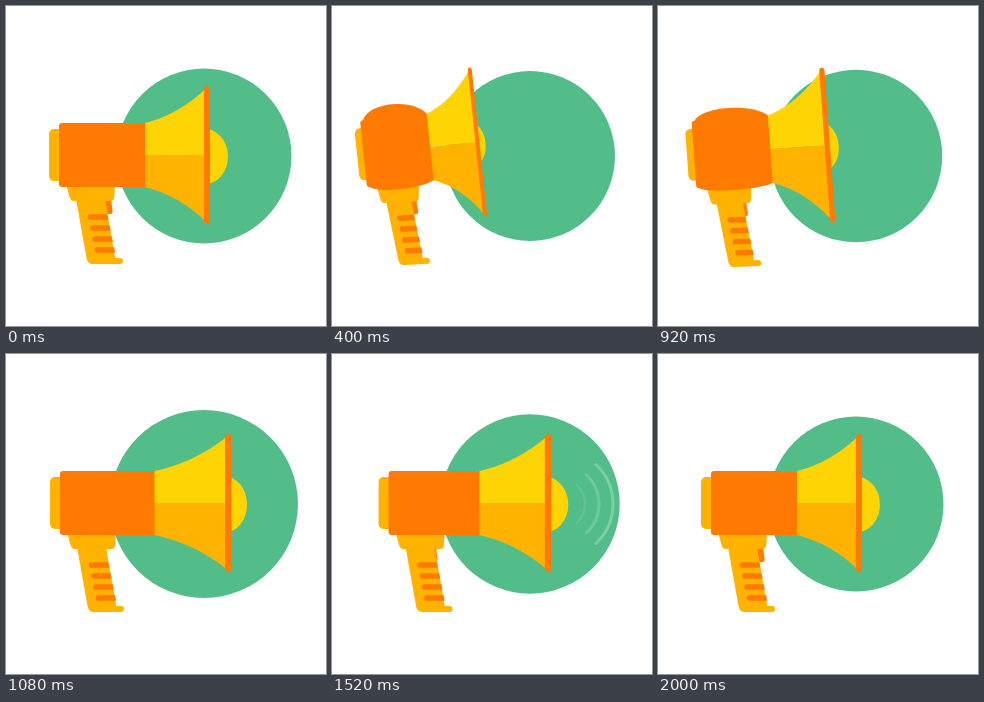
An HTML page for the animation above (2.8 s loop, 320x320 px).

```html
<!DOCTYPE html>
<html lang="en">
<head>
<meta charset="utf-8">
<title>Megaphone</title>
<style>
  html, body { margin: 0; width: 100%; height: 100%; overflow: hidden; background: #fff; }
  svg { display: block; width: 100vw; height: 100vh; }
  .green { fill: #52bd89; }
  .orange { fill: #ff7a00; }
  .amber { fill: #ffb300; }
  .yellow { fill: #ffd405; }
  .wave { fill: none; stroke: #7dcfa7; stroke-width: 3; stroke-linecap: round; }
  .ridge { fill: none; stroke: #ff7a00; stroke-width: 5.6; }
</style>
</head>
<body>
<svg viewBox="0 0 320 320">
  <circle id="disc" class="green" cx="198" cy="150" r="87.5"/>
  <g id="waves"></g>
  <!-- handle origin: middle of the collar's top edge -->
  <g id="handle">
    <path id="trigger" class="orange" d="M9 12H21L22.6 24Q23 27 20 27H14Z"/>
    <path class="amber" d="M-24-3L-20.500 10Q-19.500 14-16 14H20Q24 14 24.300 10L25-3Z"/>
    <path class="amber" d="M-14 12L-3.300 72Q-2.300 77 3 77H30Q33 77 33 74T30 71H25.200L15 12Z"/>
    <g id="ridges"></g>
  </g>
  <g id="head">
    <ellipse id="dome" class="yellow"/>
    <rect id="cap" class="amber" rx="5"/>
    <path id="hornTop" class="yellow"/>
    <path id="hornLow" class="amber"/>
    <rect id="rim" class="orange"/>
    <path id="body" class="orange"/>
  </g>
</svg>
<script>
const LOOP = 2800, STEP = 40;
const NS = "http://www.w3.org/2000/svg";
const $ = id => document.getElementById(id);

function set(el, attrs) {
  for (const k in attrs) el.setAttribute(k, attrs[k]);
  return el;
}
const add = (parent, tag, attrs) =>
  set(parent.appendChild(document.createElementNS(NS, tag)), attrs);

// x, y, turn: head; w, h, bulge: body; horn, rim, half: bell;
// hx, hy, hs, hr: handle; pull: trigger; r: disc
const rest = {
  x: 53, y: 149, turn: 0, w: 86, h: 32, bulge: 0, cap: 10,
  horn: 59, rim: 6, half: 69, dome: 18, domeH: 28,
  hx: 84, hy: 181, hs: 1, hr: 0, pull: 0, r: 87.5
};
const stretch = { ...rest, x: 54, w: 94.5, horn: 70.5, rim: 6.5, dome: 15.5, hx: 85, pull: 6.5 };
delete stretch.r;

const squash = {
  x: 26.5, y: 148.5, turn: -6.8, w: 65, h: 35, bulge: 17, cap: 5,
  horn: 44, rim: 4.4, half: 82, dome: 4.5, domeH: 19,
  hx: 63, hy: 185, hs: .84, hr: -3.5, pull: 0, r: 83.5
};

const keys = [
  [0, rest],
  [400, {
    x: 31.5, y: 148, turn: -6, w: 67, h: 33.5, bulge: 13, cap: 6.5,
    horn: 45.5, rim: 4, half: 75, dome: 6, domeH: 19,
    hx: 65.5, hy: 182.3, hs: .86, hr: -3, pull: 0, r: 85
  }],
  [720, squash],
  [800, { ...squash, x: 26, half: 83, hy: 186, r: 83.3 }],
  [1080, { ...stretch, r: 94 }],
  [1120, { r: 96 }],
  [1320, { ...stretch, x: 59.5, hx: 90.5, pull: 8, r: 94 }],
  [1680, { ...rest, x: 54, w: 87.5, horn: 61, rim: 6.5, hx: 85, pull: 1.5 }],
  [2000, rest]
];

// Monotone cubic track through the given [time, value] points
function track(pts) {
  const slope = pts.slice(1).map((p, i) => (p[1] - pts[i][1]) / (p[0] - pts[i][0]));
  const tangent = pts.map((p, i) => {
    const a = slope[i - 1] || 0, b = slope[i] || 0;
    return a * b > 0 ? 2 * a * b / (a + b) : 0;
  });
  return t => {
    let i = 0;
    while (i < pts.length - 2 && t >= pts[i + 1][0]) i++;
    const [t0, v0] = pts[i], [t1, v1] = pts[i + 1];
    const d = t1 - t0, s = Math.min(1, (t - t0) / d), q = 1 - s;
    return v0 * (1 + 2 * s) * q * q + v1 * s * s * (3 - 2 * s)
      + d * s * q * (tangent[i] * q - tangent[i + 1] * s);
  };
}

const tracks = {};
for (const name in rest) {
  tracks[name] = track(keys.filter(k => name in k[1]).map(k => [k[0], k[1][name]]));
}

for (let i = 0; i < 4; i++) {
  const x = -0.3 + 2.3 * i, y = 30 + 11 * i;
  add($("ridges"), "path", {
    class: "orange",
    d: `M${x + .8} ${y - 2.8}H${x + 17.500}L${x + 18.600} ${y + 2.8}H${x + .8}Q${x - 2} ${y + 2.8} ${x - 2} ${y}T${x + .8} ${y - 2.8}Z`
  });
}

const waves = [26, 40, 54].map(r => {
  const x = 227 + r * Math.cos(.82), y = r * Math.sin(.82);
  return add($("waves"), "path", {
    class: "wave", d: `M${x} ${150 - y}A${r} ${r} 0 0 1 ${x} ${150 + y}`
  });
});

const ramp = (t, from, len) => Math.max(0, Math.min(1, (t - from) / len));

function hornHalf(p, side) {
  const end = p.w + p.horn + p.rim / 2;
  const base = side * p.h, tip = side * (p.half - 1.500);
  return `M${p.w - 1} 0V${base}H${p.w}Q${p.w + p.horn * .58} ${base + (tip - base) * .24} ${end} ${tip}V0Z`;
}

function bodyPath({ w, h, bulge }) {
  const top = -h - bulge * 1.33, low = h + bulge * .55;
  return `M0 ${3 - h}Q0 ${-h} 3 ${-h}C${w * .15} ${top} ${w * .8} ${top} ${w} ${-h}`
    + `V${h}C${w * .8} ${low} ${w * .15} ${low} 3 ${h}Q0 ${h} 0 ${h - 3}Z`;
}

function draw(t) {
  const p = {};
  for (const name in tracks) p[name] = tracks[name](t);
  const edge = p.w + p.horn;

  set($("disc"), { r: p.r });
  set($("head"), { transform: `translate(${p.x} ${p.y}) rotate(${p.turn})` });
  set($("handle"), { transform: `translate(${p.hx} ${p.hy}) rotate(${p.hr}) scale(${p.hs} 1)` });
  set($("trigger"), { transform: `translate(${-p.pull} 0)` });
  set($("dome"), { cx: edge, cy: 1.500, rx: p.dome + p.rim, ry: p.domeH });
  set($("cap"), { x: -p.cap, y: -26, width: p.cap + 6, height: 52 });
  set($("hornTop"), { d: hornHalf(p, -1) });
  set($("hornLow"), { d: hornHalf(p, 1) });
  set($("rim"), { x: edge, y: -p.half, width: p.rim, height: 2 * p.half, rx: p.rim / 2 });
  set($("body"), { d: bodyPath(p) });
  waves.forEach((wave, i) => set(wave, {
    opacity: ramp(t, 1120 + 50 * i, 90) * (1 - ramp(t, 1420 + 50 * i, 140))
  }));
}

const start = performance.now();
function frame() {
  const t = (performance.now() - start) % LOOP;
  draw(Math.floor(t / STEP) * STEP);
  requestAnimationFrame(frame);
}
draw(0);
requestAnimationFrame(frame);
</script>
</body>
</html>
```
